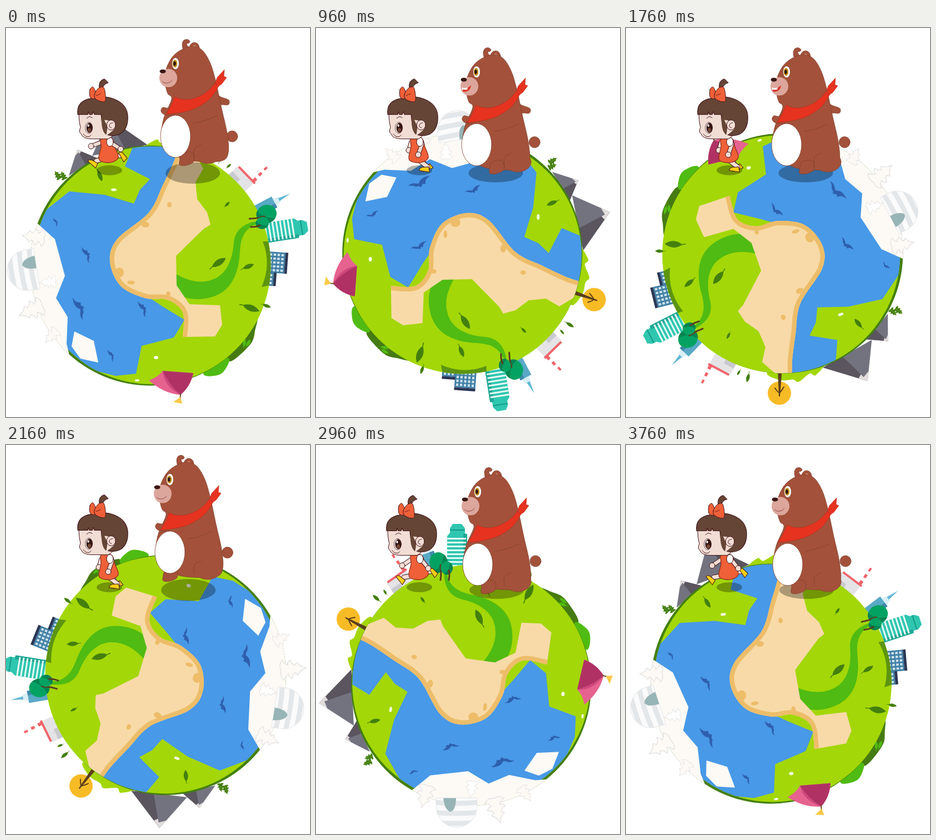
Recreate the animation shown at these times as an HTML page. Size 547x700 px, loop 3.8 s.

```html
<!DOCTYPE html>
<html lang="en">
<head>
<meta charset="utf-8">
<title>Walk around the world</title>
<style>
html, body { margin: 0; width: 100%; height: 100%; overflow: hidden; background: #fff; }
svg { display: block; width: 547px; height: 700px; }
</style>
</head>
<body>
<svg viewBox="0 0 547 700">
  <g id="globe"></g>
  <g id="walkers"></g>
</svg>
<script>
const PIVOT = '272.4 418.4';
const LAND = '#a3d707', DARK = '#447f0e', MID = '#50bb12', SEA = '#4899e7', ICE = '#fdfaf6';
const SAND = '#f8daa8', SHORE = '#edbd69', WOOD = '#5b3f1e';
const FUR = '#a3513a', FUR_LINE = '#82402f', RED = '#e63320';
const SKIN = '#f2ddd4', HAIR = '#654536', INK = '#43141a', DRESS = '#ef6038', YELLOW = '#fbce16';

// Basic shapes; points are written "x,y x,y ..."
const poly = (pts, fill) => `<polygon points="${pts}" fill="${fill}"/>`;
const path = (d, fill, more = '') => `<path d="${d}" fill="${fill}" ${more}/>`;
const oval = (x, y, rx, ry, fill, more = '') =>
  `<ellipse cx="${x}" cy="${y}" rx="${rx}" ry="${ry}" fill="${fill}" ${more}/>`;
const rect = (x, y, w, h, fill) => `<rect x="${x}" y="${y}" width="${w}" height="${h}" fill="${fill}"/>`;
const pen = (color, w = 1) => `stroke="${color}" stroke-width="${w}" stroke-linecap="round" stroke-linejoin="round"`;
const place = (x, y, deg, size, body) =>
  `<g transform="translate(${x} ${y}) rotate(${deg}) scale(${size})">${body}</g>`;
const clipped = (id, shape, body) =>
  `<clipPath id="${id}">${shape}</clipPath><g clip-path="url(#${id})">${body}</g>`;
const repeat = (n, draw) => Array.from({ length: n }, (_, i) => draw(i)).join('');
const mix = (a, b, t) => a + (b - a) * t;
// Parts laid out as they stand once the globe has turned by deg
const turned = (deg, ...parts) => `<g transform="rotate(${-deg} ${PIVOT})">${parts.join('')}</g>`;

// Smooth curve through points
function curve(pts, closed) {
  const p = pts.split(' ').map(s => s.split(',').map(Number)), n = p.length;
  const at = i => closed ? p[(i + n) % n] : p[Math.max(0, Math.min(n - 1, i))];
  let d = 'M' + p[0];
  for (let i = 0; i < (closed ? n : n - 1); i++) {
    const [a, b, c, e] = [at(i - 1), at(i), at(i + 1), at(i + 2)];
    d += 'C' + [0, 1].map(k => b[k] + (c[k] - a[k]) / 6) + ' ' +
      [0, 1].map(k => c[k] - (e[k] - b[k]) / 6) + ' ' + c;
  }
  return d + (closed ? 'Z' : '');
}
const blob = (pts, fill, more) => path(curve(pts, true), fill, more);
const line = (pts, color, w) => path(curve(pts), 'none', pen(color, w));

const leaf = (x, y, size, deg, fill = DARK) => place(x, y, deg, size / 30,
  path('M-15 0Q0-11 15 0Q0 11-15 0Z', fill) + line('-15,0 -20,1', fill, 1.5));
const bird = (x, y, w) => place(x, y, 0, w / 44,
  path('M-22-5Q-12-7-6-1L-2 0Q5-9 22-3Q13-2 10 2L8 6L3 4L-2 8L-5 4L-10 3Q-13-2-22-5Z', '#2e5fae'));

// Fir made of three mirrored tiers
function fir(x, y, deg, size, fill, edge = '') {
  const side = s => `Q${3 * s} -10 ${9 * s} -8Q${7 * s} -5 ${5 * s} -5Q${7 * s} 0 ${13 * s} 1Q${10 * s} 6 ${6 * s} 5Q${8 * s} 10 ${14 * s} 12Q${8 * s} 18 0 15`;
  return place(x, y, deg, size, path('M0-20' + side(1), fill, edge) + path('M0-20' + side(-1), fill, edge));
}

function office(x, y, cols, rows) {
  const w = cols * 7 + 3, h = rows * 7 + 3;
  return place(x, y, 4, 1, rect(0, 0, w, h, '#4180a6') + rect(w, 0, 5, h, '#2b3655') +
    repeat(cols * rows, i => rect(3 + i % cols * 7, 3 + Math.floor(i / cols) * 7, 4.5, 4, '#cfe3ee')));
}

function skyline() {
  const tower = path('M236 222V164L241 158V150L246 142H262L268 150V158L272 164V222Z', '#2fc6b0') +
    rect(265, 160, 7, 62, '#1fa795') + rect(241, 152, 27, 2, '#169985') +
    repeat(8, i => rect(236, 167 + i * 7, 34, 3, '#e9faf6'));
  const factory = rect(-22, -25, 42, 32, '#e4e4e6') + rect(-22, -12, 20, 20, '#c9cacf') + rect(-20, -28, 42, 4, '#f0646a') +
    repeat(5, i => rect(14, -34 - i * 7, 6 - i * .5, 7, i % 2 ? '#fff' : '#f0646a'));
  const spire = rect(-11, -34, 22, 40, '#59a9c6') + rect(3, -34, 8, 40, '#3f88aa') +
    path('M-7-34L-4-44H5L8-34Z', '#d8eef5') + path('M-3-43L0-66L3-43Z', '#62b7d6');
  return place(414, 282, 46, 1, factory) + place(453, 329, 62, 1, spire) + turned(279, tower) +
    office(472, 402, 4, 5) + office(465, 439, 2, 3);
}

// Mountain from base a over tip t to base b, with a shaded side and a snow cap
function peak(a, t, b) {
  const on = (p, q, k) => [0, 1].map(i => mix(p[i], q[i], k));
  const ridge = on(b, a, .4);
  return poly([a, t, b], '#737380') + poly([ridge, t, b], '#5a555e') +
    poly([t, on(t, a, .24), on(t, ridge, .16), on(t, ridge, .27), on(t, b, .2)], '#e2dddc');
}

const yellowTree = () => oval(276, 657, 21, 21, '#f7bb25') + path('M273 612H281L277 663H275Z', WOOD) +
  line('268,648 276,656 284,646', WOOD, 2);

function roundTree(x, y, r) {
  return oval(x, y, r, r * 1.12, '#04a262') +
    path(`M${x + r * .6} ${y - r * .9}A${r} ${r * 1.12} 0 0 1 ${x - r * .5} ${y + r}Q${x + r * .5} ${y + r * .5} ${x + r * .6} ${y - r * .9}Z`, '#038451') +
    line(`${x + 4},${y + 5} ${x + 5},${mix(y, 243, .6)} ${x + 4},243`, WOOD, 3);
}

const tent = () => path('M257 634Q274 628 282 617L337 621Q332 645 314 660Q284 658 257 634Z', '#e6628f') +
  path('M282 617L337 621Q332 645 314 660Q291 645 282 617Z', '#b03265') +
  path('M282 617Q284 645 314 660Q294 643 282 617Z', '#cf487c') +
  line('314,658 313,672', '#6b4a2a', 2) + poly('301,673 314,664 317,676', '#fbc94a');

function iceCamp() {
  const edge = pen('#e4e2e1', 1.1), dome = 'M216 635H290V650A37 38 0 0 1 216 650Z';
  const igloo = rect(210, 630, 90, 65, '#fbfbfb') +
    repeat(3, i => path(`M210 ${638 + i * 18}q43 5 86 0v9q-43 5-86 0Z`, '#e4e7e9')) +
    path('M229 634H252Q252 657 242 660Q231 657 229 634Z', '#97b4b6');
  return clipped('dome', path(dome), igloo) + path(dome, 'none', pen('#e6e7e8')) +
    fir(196, 630, 195, 1.15, ICE, edge) + fir(280, 618, 187, .85, '#fff', edge) +
    fir(325, 655, 165, 1.3, ICE, edge) + fir(376, 627, 143, .85, ICE, edge);
}

function beach() {
  const shore = curve('313,205 303,238 282,283 257,332 200,380 187,420 206,464 250,486 290,489 318,512 318,556');
  const sand = shore + 'L376 555L389 534L385 499L330 497L307 463L306 410L356 361L368 354L362 332L344 308L341 277L355 253L326 205Z';
  const stones = oval(251, 354, 7, 5, SHORE) + oval(294, 318, 4, 5, SHORE) + oval(225, 458, 7, 3.5, SHORE) +
    oval(204, 440, 8, 9, SHORE) + oval(292, 479, 4, 5, SHORE);
  return path(sand, SAND) + clipped('sand', path(sand), path(shore, 'none', pen(SHORE, 16)) + stones);
}

function drawGlobe() {
  const behind = peak([155, 230], [185, 162], [254, 210]) + peak([113, 266], [128, 219], [164, 234]) +
    blob('245,222 270,201 280,207 303,199 312,206 334,212 352,232 300,240', LAND) +
    turned(162, yellowTree()) + skyline() +
    blob('449,520 448,545 439,570 402,600 400,560', '#467b12') + blob('400,594 394,615 380,625 356,624 360,600', MID) +
    leaf(429, 567, 16, -80, MID) + leaf(436, 567, 16, -60, MID) +
    fir(93, 265, -35, .48, DARK) + fir(103, 266, -25, .45, DARK);
  const sea = poly('232,205 330,205 315,300 215,400 205,450 280,500 321,525 302,557 244,572 234,622 197,626 150,614 105,592 40,500 40,345 57,352 66,332 114,294 177,300 230,316 241,291 259,272 214,249', SEA);
  const river = path('M300 439Q345 468 380 449Q407 432 410 385Q414 349 465 346V350Q423 354 421 400Q418 486 345 488Q320 488 300 474Z', MID);
  const flecks = oval(194, 291, 5, 2.5, '#f6fbe4') + oval(270, 593, 4, 3, '#f6fbe4') + oval(236, 634, 4, 2, '#f6fbe4');
  const banks = path('M462 384Q478 425 460 466L490 460V384Z', '#5d9411') + path('M382 240Q420 265 442 302L460 280L400 220Z', '#5d9411');
  const ice = poly('20,330 57,352 88,380 106,446 90,486 111,520 109,568 114,589 100,620 20,600', ICE);
  const rim = `<circle cx="259" cy="427.5" r="216" fill="${DARK}"/>`;
  const disk = '<circle cx="262.4" cy="427" r="214"/>';
  return behind + rim + clipped('disk', disk, rect(30, 190, 460, 470, LAND) + river + sea + beach() + flecks + banks) +
    clipped('rim', rim, ice) + poly('123,546 158,563 166,602 134,595 118,573', ICE) +
    turned(117, bird(260, 255, 44), bird(340, 310, 32), bird(207, 356, 32), bird(417, 287, 18), bird(158, 267, 24)) +
    leaf(383, 422, 30, -33) + leaf(436, 429, 22, -22) + leaf(441, 504, 32, 20) + leaf(469, 500, 16, 20) +
    leaf(398, 317, 13, -45) + leaf(169, 266, 21, 68) + leaf(388, 234, 17, -58) + leaf(401, 248, 11, -40) +
    turned(279, iceCamp(), roundTree(220, 211, 16), roundTree(235, 221, 10.5)) + tent();
}

// Height and forward sway of the bear through its eight-step walk
const LIFT = [20, 24, 5, 1, 9, 14, 22, 0], SWAY = [14, 9, -2, -2, 0, 2, 4, 0];
const thin = pen(FUR_LINE, .8);

function bearFace(k) {
  const mouth = k === 5
    ? path('M264 108Q272 103 276 110L276 124Q266 128 264 118Z', '#c92f22') + path('M265 108Q270 105 275 109L273 112H265Z', '#fff')
    : k > 1 && k < 5
      ? path('M264 112Q273 116 281 108Q280 120 267 120Z', '#d83a2c') + path('M264 112Q270 114 275 112L274 116H265Z', '#fff')
      : line('267,116 272,119 280,118 285,114', '#8a4a40', 1);
  return oval(278, 110, 16, 16.5, '#dda69c') + oval(268, 98, 5.5, 3.6, '#3a1713') +
    oval(291, 84, 6.5, 10.5, '#fff', pen('#6a3326', .6)) + oval(290, 84, 4.2, 7, '#c2901c') +
    oval(289.5, 84, 2.3, 4, '#2a1508') + mouth;
}

function bear(k) {
  const up = LIFT[k], dx = SWAY[k], hem = pen('#b5281a', .6);
  const part = (x, y, rx, ry) => oval(x, y, rx, ry, FUR, thin);
  const footX = 310 + 21 * Math.cos((k - 1) * Math.PI / 4), footY = 258 - up, hipY = 246 - up;
  const backArm = k < 3 ? blob('360,140 375,145 387,150 386,158 374,158 362,160', FUR, thin) : '';
  const paw = k < 3 || k === 6 ? blob('290,158 278,164 268,163 265,170 272,176 288,175', FUR, thin) : '';
  const body = backArm + path('M306 62Q300 48 306 42Q313 38 317 44Q316 49 311 47Q311 54 318 56Z', FUR, thin) +
    part(325, 56, 9, 10) + oval(325, 57, 4, 6, '#c98d78') +
    blob('284,74 300,60 321,53 339,60 353,82 363,114 374,165 384,210 386,244 374,259 330,260 300,254 277,236 266,214 270,182 284,148 277,138 273,122 273,98', FUR, thin);
  const scarf = path('M274 175Q284 160 290 144Q302 151 320 148Q348 141 362 119L369 124Q357 148 338 158Q318 172 274 175Z', RED, hem) +
    path('M363 117L366 109L379 95L378 107L383 109L374 121L368 125Z', RED, hem);
  return part(395 + dx * .85, 209 - up * .7, 10, 10) + part(363, hipY, 24, 18) + place(dx, -up, 0, 1, body) +
    oval(363, hipY, 23.5, 17.5, FUR) + line(`339,${hipY + 8} 339,${hipY - 8} 351,${hipY - 16}`, FUR_LINE, .8) +
    place(footX, footY, 0, 1, blob('-13,4 -8,-12 10,-14 13,2 0,9 -11,9', FUR, thin)) +
    place(dx, -up, 0, 1, oval(291, 215, 27, 38, '#fff', thin) + paw + line('323,191 342,187 366,178', FUR_LINE, .8) + bearFace(k) + scarf);
}

const limb = (pts, w = 6) => line(pts, INK, w + 2) + line(pts, SKIN, w);
const shoe = (x, y, deg) => place(x, y, deg, 1, path('M-10 4Q-10-2-3-3L6-5L9 4Z', YELLOW, pen(INK)));
const fist = (x, y) => oval(x, y, 5, 5, SKIN, pen(INK));

// open: 0 legs together, 1 full stride; the fists swing up halfway
function girlBody(open) {
  const swing = Math.sin(Math.PI * open);
  const front = [mix(196, 153, open), mix(254, 242, open)], back = [mix(201, 212, open), mix(251, 229, open)];
  const near = [mix(167, 155, open) - 10 * swing, mix(220, 217, open) - 15 * swing];
  const far = [mix(184, 202, open) + 20 * swing, mix(228, 222, open) - 15 * swing];
  return limb(`188,230 ${back[0] - 3},${back[1] - 1}`) + shoe(...back, mix(-20, 57, open) + 40 * swing) +
    limb(`180,234 ${front[0] + 5},${front[1] - 4}`, 7) + shoe(...front, mix(8, 52, open) - 20 * swing) +
    limb(`171,206 ${near}`) + fist(...near) +
    blob('171,198 190,198 196,214 202,233 189,242 171,240 167,232 171,214', DRESS, pen('#8c2b18', 1.2)) +
    limb(`191,208 ${far}`) + oval(187, 205, 6, 8, '#fff', pen(INK)) + fist(...far);
}

function girlHead() {
  return path('M166 107Q163 92 175 89L182 96Q173 98 171 108Z', HAIR, pen(INK)) +
    path('M129 150Q129 166 132 176Q128 185 133 188Q136 197 152 197L182 197Q194 192 194 175L185 148Z', SKIN, pen(INK)) +
    path('M127 153Q124 128 152 124C178 116 215 126 217 156C218 176 209 191 190 191Q173 191 171 174L169 153H157L155 148L153 153H148L146 148L145 153Z', HAIR, pen(INK, 1.2)) +
    blob('171,164 192,168 193,178 184,187 178,190 171,186', SKIN) + path('M170 153V170Q171 184 178 190Q180 184 180 174Z', HAIR) +
    oval(187, 172, 8, 9, SKIN, pen(INK)) + line('190,168 185,170 184,175 188,177', INK, 1) +
    oval(147, 177, 6.5, 10, '#fff', pen(INK, .8)) + oval(148, 177, 5.5, 9, '#351613') +
    oval(148, 181, 3, 3.5, '#7b4a38') + oval(146, 173, 1.7, 2.2, '#fff') +
    line('143,160 148,157 153,159', INK, 1) + line('137,188 141,192 147,193 151,190', INK, 1) +
    blob('149,108 155,104 160,117 156,125 149,121', DRESS, pen(INK)) +
    blob('157,117 164,106 174,105 177,127 170,130 159,125', DRESS, pen(INK)) + line('160,119 168,116', INK, .8);
}

function girl(k) {
  const sway = 3 * Math.sin((k + 1) % 4 * Math.PI / 4);
  const bob = 1.5 + 1.5 * Math.cos((k - 1) * Math.PI / 4);
  return girlBody([.9, .5, 0, 1][k % 4]) + place(sway, bob, 0, 1, girlHead());
}

const shadow = (x, y, rx, ry) => oval(x, y, rx, ry, '#000', 'opacity=".3"');
const walkers = k => shadow(186, 256, 23, 9) + shadow(325 + SWAY[k] * .8, 261, 49, 16 + LIFT[k] / 6) + girl(k) + bear(k);

const globe = document.getElementById('globe'), crew = document.getElementById('walkers');
globe.innerHTML = drawGlobe();
const poses = LIFT.map((_, k) => walkers(k));
const start = performance.now();
let shown = -1;

// 40 drawings of 95 ms, refreshed every 80 ms; an eight-drawing walk over one full turn
function tick(now) {
  const t = Math.max(0, now - start) % 3800;
  const step = Math.floor(Math.floor(t / 80) * 80 / 95);
  if (step !== shown) {
    shown = step;
    globe.setAttribute('transform', `rotate(${step * 9} ${PIVOT})`);
    crew.innerHTML = poses[step % 8];
  }
  requestAnimationFrame(tick);
}
tick(start);
</script>
</body>
</html>
```
